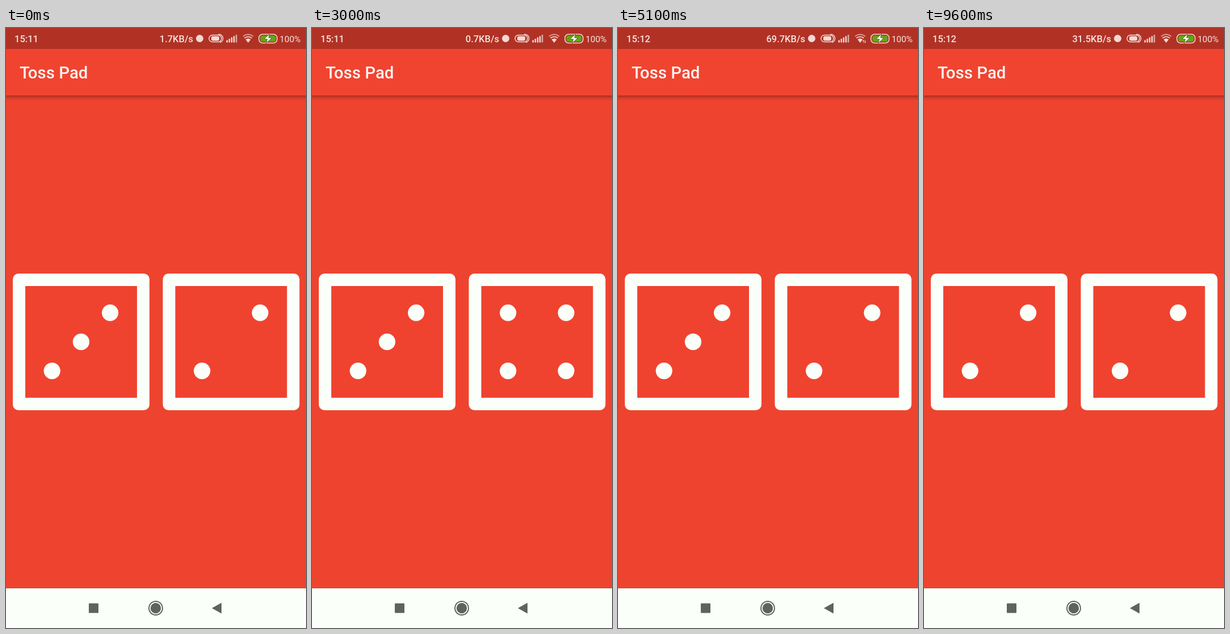
An HTML page for the animation above (9700 ms loop, 529 px wide and 1058 px high).

```html
<!DOCTYPE html>
<html lang="en">
<head>
<meta charset="utf-8">
<title>Dice</title>
<style>
  html, body { margin: 0; width: 100%; height: 100%; overflow: hidden; background: #ee442f; }
  svg { display: block; width: 100%; height: 100%; }
  text { font-family: Roboto, "Noto Sans", sans-serif; }
  .status { font-size: 16.5px; font-weight: 500; fill: #f8e5e1; }
</style>
</head>
<body>
<svg viewBox="0 0 529 1058">
  <defs>
    <linearGradient id="shade" x1="0" y1="0" x2="0" y2="1">
      <stop offset="0" stop-color="#7d1c12" stop-opacity=".62"/>
      <stop offset=".35" stop-color="#8d2016" stop-opacity=".3"/>
      <stop offset="1" stop-color="#a0281c" stop-opacity="0"/>
    </linearGradient>
  </defs>
  <rect width="529" height="1058" fill="#ee442f"/>
  <rect y="37" width="529" height="82" fill="#f04430"/>
  <rect y="119" width="529" height="10" fill="url(#shade)"/>
  <rect width="529" height="37" fill="#b13225"/>

  <text id="clock" class="status" x="15" y="25"></text>
  <text id="speed" class="status" x="330" y="25" text-anchor="end"></text>
  <text class="status" x="482.5" y="24.5" style="font-size:15.3px;font-weight:400">100%</text>
  <text x="24" y="89" font-size="29.4" font-weight="500" fill="#fcf6f3">Toss Pad</text>

  <g fill="#f3d9d4">
    <circle cx="341.5" cy="18.5" r="6.5"/>
    <rect x="362" y="14.5" width="14" height="8" rx="3"/>
    <g id="bars"></g>
    <path d="M422.5 20.2Q427 16.7 431.5 20.2L427 26Z"/>
  </g>
  <g fill="none" stroke="#f3d9d4" stroke-width="1.5">
    <path d="M376 24.5H364A6 6 0 0 1 364 12.5H374A6 6 0 0 1 374 24.5M374 11.5A7 7 0 0 1 377 25.5"/>
    <path d="M420.5 17.8Q427 12.8 433.5 17.8" stroke-width="1.8"/>
    <path d="M418 14.8Q427 7.8 436 14.8" stroke-width="1.8" opacity=".65"/>
  </g>
  <path id="traffic" d="M432.8 26V21.5M431.5 23L432.8 21.3L434.1 23M435.8 21.5V26M434.5 24.5L435.8 26.2L437.1 24.5"
    fill="none" stroke="#f3d9d4" stroke-width=".9"/>

  <rect x="446" y="11" width="32" height="15.5" rx="6.5" fill="none" stroke="#ead9c9" stroke-width="1.6"/>
  <rect x="448.5" y="13.5" width="27" height="10.5" rx="4" fill="#65a515"/>
  <path d="M464.5 10.5L455 19.8H461L458.5 27L469 17.2H463Z" fill="#fff" stroke="#63711a" stroke-width="1"/>

  <g id="dice"></g>

  <rect y="987.5" width="529" height="70.5" fill="#fbfffa"/>
  <rect y="987" width="529" height="1" fill="#b5473a"/>
  <g fill="#60625f">
    <rect x="146" y="1014.5" width="17" height="17" rx="1"/>
    <circle cx="264" cy="1023" r="9.2"/>
    <circle cx="264" cy="1023" r="12" fill="none" stroke="#60625f" stroke-width="1.9"/>
    <path d="M363 1023L380 1013.5V1032.5Z"/>
  </g>
</svg>
<script>
const LOOP = 9700;
const $ = id => document.getElementById(id);

function add(parent, tag, attrs) {
  const node = document.createElementNS("http://www.w3.org/2000/svg", tag);
  for (const key in attrs) node.setAttribute(key, attrs[key]);
  parent.append(node);
  return node;
}

// Each entry holds its start time and the value shown from then on.
const rolls = [[0, [3, 2]], [900, [6, 2]], [2000, [3, 4]], [3200, [6, 1]], [4600, [3, 2]], [6100, [2, 2]]];
const speeds = [[0, "1.7KB/s"], [600, "0.7KB/s"], [4600, "69.7KB/s"], [8600, "31.5KB/s"]];
const clocks = [[0, "15:11"], [3200, "15:12"]];
const at = (track, t) => track.findLast(([start]) => start <= t)[1];

// Pip positions by column and row, and the face values that show them.
const pips = [
  [2, 0, "23456"], [0, 2, "23456"], [1, 1, "135"],
  [0, 0, "456"], [2, 2, "456"], [0, 1, "6"], [2, 1, "6"]
];

function makeDie(x) {
  const die = add($("dice"), "g", { transform: `translate(${x} 433)`, fill: "#fbfffa" });
  add(die, "rect", { width: 241, height: 241, rx: 10 });
  add(die, "rect", { x: 22, y: 22, width: 197, height: 197, fill: "#ef432f" });
  return pips.map(([col, row]) =>
    add(die, "circle", { cx: 69.2 + col * 51.2, cy: 69.2 + row * 51.2, r: 14.6 }));
}

function showFace(dots, value) {
  dots.forEach((dot, i) =>
    dot.setAttribute("visibility", pips[i][2].includes(value) ? "visible" : "hidden"));
}

for (let i = 0; i < 5; i++) {
  const height = 4 + i * 2.4;
  add($("bars"), "rect", { x: 388.5 + i * 4.1, y: 25.5 - height, width: 2.5, height, opacity: i < 4 ? 1 : .7 });
}

const dice = [makeDie(12), makeDie(276.5)];

function render(now) {
  const t = now % LOOP;
  const speed = at(speeds, t);
  at(rolls, t).forEach((value, i) => showFace(dice[i], value));
  $("clock").textContent = at(clocks, t);
  $("speed").textContent = speed;
  $("traffic").setAttribute("visibility", speed.startsWith("69") ? "visible" : "hidden");
}

const begin = performance.now();
function tick() {
  render(performance.now() - begin);
  requestAnimationFrame(tick);
}
tick();
</script>
</body>
</html>
```
